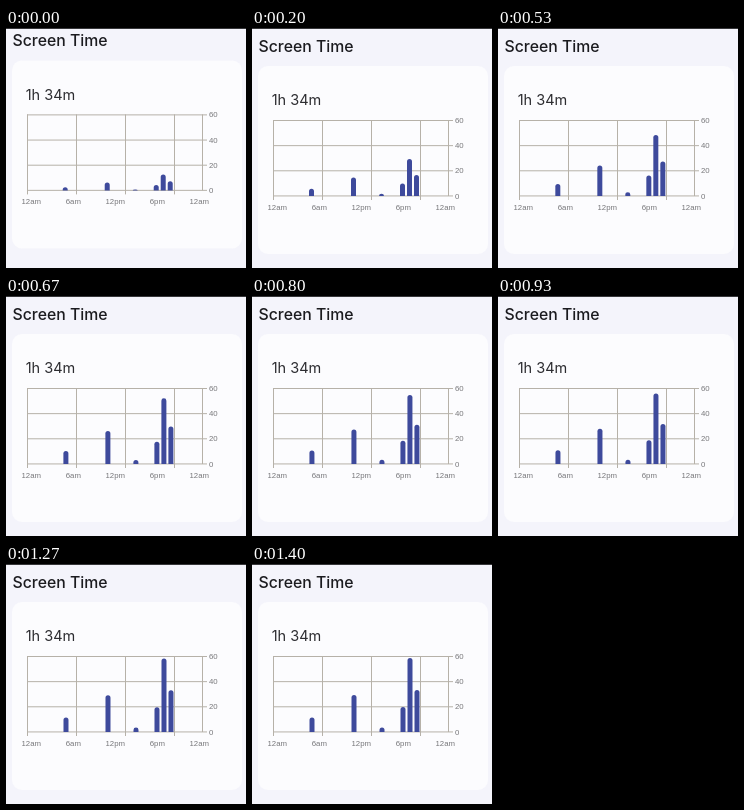
These frames come from a looping animation (240 by 240 pixels, 1.47 s). An HTML page:

```html
<!DOCTYPE html>
<html lang="en">
<head>
<meta charset="utf-8">
<title>Screen Time</title>
<style>
  html, body { margin: 0; width: 100%; height: 100%; overflow: hidden; background: #f4f4fb; }
  svg { display: block; width: 100vw; height: 100vh; }
  .title { font: 500 15.8px Inter, sans-serif; fill: #1b1b1f; }
  .total { font: 400 14.5px Inter, sans-serif; fill: #2c2c30; }
  .label { font: 7.8px "Liberation Sans", Arial, sans-serif; fill: #77777a; }
  .grid { stroke: #b6b1a8; stroke-width: 1; fill: none; }
  .bar { fill: #3e4a9c; }
</style>
</head>
<body>
<svg viewBox="0 0 240 240">
  <rect width="240" height="240" fill="#f4f4fb"/>
  <rect width="240" height="1" fill="#37373a"/>
  <g id="page">
    <text class="title" x="6.5" y="24">Screen Time</text>
    <rect x="6" y="38" width="230" height="188" rx="10" fill="#fcfcfe"/>
    <text class="total" x="19.7" y="77.2">1h 34m</text>
    <g id="axes"></g>
    <g id="bars"></g>
  </g>
</svg>
<script>
const LOOP = 1470, BASE = 168;
const page = document.getElementById('page');
const axes = document.getElementById('axes');
const barLayer = document.getElementById('bars');

function add(parent, tag, attrs, text) {
  const el = document.createElementNS('http://www.w3.org/2000/svg', tag);
  for (const key in attrs) el.setAttribute(key, attrs[key]);
  if (text !== undefined) el.textContent = text;
  parent.appendChild(el);
  return el;
}

[60, 40, 20, 0].forEach((value, i) => {
  const y = 92.5 + i * 25.15;
  add(axes, 'path', { class: 'grid', d: `M21 ${y}H201` });
  add(axes, 'text', { class: 'label', x: 203, y: y + 2.6 }, value);
});
[21.5, 70.5, 119.5, 168.5, 196.5].forEach((x, i) => {
  add(axes, 'path', { class: 'grid', d: `M${x} 92V${i < 4 ? 172 : BASE}` });
});
['12am', '6am', '12pm', '6pm', '12am'].forEach((name, i) => {
  add(axes, 'text', { class: 'label', x: 25.3 + i * 42, y: 182, 'text-anchor': 'middle' }, name);
});

// centre x and full height of each bar
const bars = [[60, 14.5], [102, 37], [130, 4.5], [151, 25], [158, 74], [165, 42]]
  .map(([x, h]) => ({ x, h, el: add(barLayer, 'path', { class: 'bar' }) }));

// growth of the bars: time in ms, share of full height
const growth = [[0, .216], [200, .5], [400, .74], [670, .89], [800, .932], [1130, .98], [1400, 1]];

function slope(i) {
  const a = growth[Math.max(i - 1, 0)];
  const b = growth[Math.min(i + 1, growth.length - 1)];
  return (b[1] - a[1]) / (b[0] - a[0]);
}

// smooth curve through the growth points
function grown(t) {
  let i = 0;
  while (i < growth.length - 2 && t > growth[i + 1][0]) i++;
  const [t0, v0] = growth[i], [t1, v1] = growth[i + 1];
  const d = t1 - t0, u = Math.min((t - t0) / d, 1), w = 1 - u;
  return v0 * w * w * (1 + 2 * u) + v1 * u * u * (3 - 2 * u)
    + d * u * w * (slope(i) * w - slope(i + 1) * u);
}

// three pictures in every 200 ms
function stepTime(t) {
  const start = Math.floor(t / 200) * 200, rest = t - start;
  return start + (rest >= 130 ? 130 : rest >= 70 ? 70 : 0);
}

function barPath(x, h) {
  const r = Math.min(2.5, h), left = x - 2.5, top = BASE - h;
  return `M${left} ${BASE}V${top + r}a2.5 ${r} 0 0 1 5 0V${BASE}z`;
}

function draw(ms) {
  const t = stepTime(ms % LOOP), share = grown(t);
  const lift = 5.6 * Math.pow(Math.max(0, 1 - t / 200), 1.7);
  page.setAttribute('transform', `translate(0 ${-lift})`);
  for (const bar of bars) {
    bar.el.setAttribute('d', barPath(bar.x - (1 - share), bar.h * share));
  }
}

let began;
function tick(now) {
  if (began === undefined) began = now;
  draw(now - began);
  requestAnimationFrame(tick);
}
draw(0);
requestAnimationFrame(tick);
</script>
</body>
</html>
```
